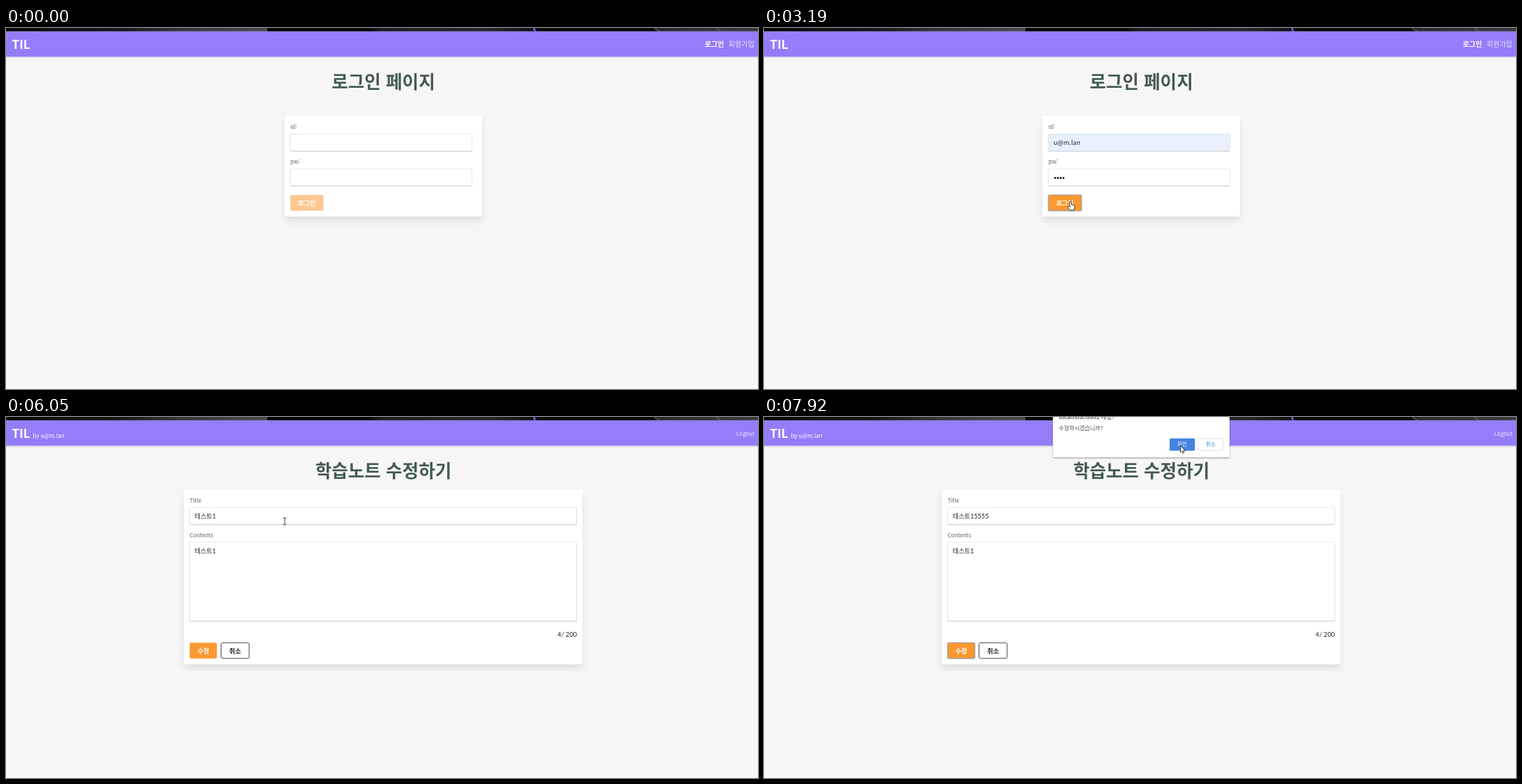
Write an HTML page that moves like this. It is 1079 by 519 pixels and loops after 7990 ms.

```html
<!DOCTYPE html>
<html lang="ko">
<head>
<meta charset="utf-8">
<title>TIL</title>
<style>
  html, body { margin: 0; width: 100%; height: 100%; overflow: hidden; background: #f6f6f8 }
  svg { display: block; width: 1079px; height: 519px; font-family: "Noto Sans CJK KR", "Noto Sans CJK", sans-serif; fill: #222 }
  .lato { font-family: Lato, "Noto Sans CJK KR", "Noto Sans CJK", sans-serif }
  .b { font-weight: 700 }
  .h1 { font-size: 25.6px; font-weight: 700; text-anchor: middle; fill: #435a53 }
  .h2 { font-size: 13.71px; font-weight: 700; fill: #111 }
  .body { font-size: 10.2px }
  .date { font-size: 8.23px; fill: #999 }
  .label { font-size: 8px; fill: #5b6270 }
  .input { font-size: 9.14px }
  .w { fill: #fff }
  .card { fill: #fff; filter: drop-shadow(0 7px 4px rgba(0,0,0,.075)) drop-shadow(0 1px 3px rgba(0,0,0,.03)) }
  .field { fill: #fff; stroke: #dfe2e7; stroke-width: .8; filter: drop-shadow(0 1px .6px rgba(0,0,0,.16)) }
  .field.auto { fill: #e8f0fe }
  .field.focus { stroke: #6f9fe6; stroke-width: 1.1 }
  .btn { fill: #fb982f }
  .btn.off { fill: #fcc994 }
  .btn.ring { stroke: #9a9ea6; stroke-width: 1.2 }
  .pop { fill: #fff; filter: drop-shadow(0 1px 1.3px rgba(0,0,0,.4)) }
  .caret { stroke: #111; stroke-width: .9 }
  .icon { fill: #34495e }
</style>
</head>
<body>
<svg viewBox="0 0 1079 519">
  <defs>
    <linearGradient id="strip">
      <stop offset="0" stop-color="#08080a"/><stop offset=".15" stop-color="#151518"/>
      <stop offset=".23" stop-color="#34343a"/><stop offset=".347" stop-color="#48484d"/>
      <stop offset=".348" stop-color="#050506"/><stop offset=".48" stop-color="#050506"/>
      <stop offset=".5" stop-color="#1b1b20"/><stop offset=".64" stop-color="#26262c"/>
      <stop offset=".72" stop-color="#08080a"/><stop offset=".86" stop-color="#08080a"/>
      <stop offset=".87" stop-color="#29292e"/><stop offset="1" stop-color="#3a3a40"/>
    </linearGradient>
    <g id="actions" class="icon">
      <path d="M0 10V7.6L6.2 1.4 8.6 3.8 2.4 10ZM7 .6 7.8-.2Q8.2-.5 8.6-.1L10 1.3Q10.3 1.7 10 2.1L9.3 2.9Z" transform="scale(.93)"/>
      <path d="M0 1H2.2L2.8.3H5.2L5.8 1H8V2.2H0ZM.6 3H7.4V9Q7.4 10 6.4 10H1.6Q.6 10 .6 9Z" transform="translate(12.8 -.4) scale(.95)"/>
    </g>
  </defs>

  <rect width="1079" height="519" fill="#f6f6f8"/>
  <rect y="5" width="1079" height="36.3" fill="#957df9" style="filter:drop-shadow(0 1px 1.5px rgba(0,0,0,.13))"/>
  <rect width="1079" height="4.8" fill="url(#strip)"/>
  <path d="M757.5 0 759 4.8" stroke="#6a66ff" stroke-width="2.4"/>
  <path d="M930 0 938 4.8M1019 0 1026 4.8" stroke="#77777c"/>
  <text class="w b" x="8.5" y="30" font-size="17.14">TIL</text>

  <g id="login">
    <text class="w b" x="1002.5" y="27" font-size="10.06">로그인</text>
    <text class="w" x="1036.7" y="27" font-size="10.06" opacity=".82">회원가입</text>
    <text class="h1" x="541.5" y="87.4">로그인 페이지</text>
    <rect class="card" x="399.5" y="126.5" width="283.5" height="144.5" rx="1"/>
    <text class="label" x="408" y="145">id:</text>
    <text class="label" x="408" y="195">pw:</text>
    <rect class="field" id="idField" x="408" y="152.6" width="260.6" height="24" rx="1"/>
    <rect class="field" id="pwField" x="408" y="202.6" width="260.6" height="24" rx="1"/>
    <text class="input" id="idText" x="415.5" y="168.4">u@m.lan</text>
    <g id="dots"></g>
    <path class="caret" id="pwCaret" d="M0 208.5V221.5"/>
    <rect class="btn" id="loginBtn" x="408" y="240" width="47.6" height="22.8" rx="2"/>
    <text class="w b input" x="431.8" y="255.1" text-anchor="middle">로그인</text>
    <g id="menu">
      <text id="preview" x="415.5" y="168.4" font-size="7.6" fill="#111">u@m.lan</text>
      <path class="caret" d="M415.6 157.5V171.5"/>
      <rect class="pop" x="407.5" y="177.5" width="109.5" height="90.5"/>
      <rect id="hover" x="408" y="181.5" width="109" height="20.5" fill="#c8c8c8"/>
      <g font-size="7.2" fill="#444">
        <text x="415" y="194.5">u@m.lan</text>
        <text x="415" y="215" font-size="7.9">두온빛</text>
        <text x="415" y="235.4">peka4312</text>
        <text x="415" y="255.8">peka4312@mova.lan</text>
      </g>
    </g>
  </g>

  <g id="member">
    <text class="w" x="38.5" y="30" font-size="8">by u@m.lan</text>
    <text class="w" x="1074" y="27" font-size="8" text-anchor="end" opacity=".85">Logout</text>
  </g>

  <g id="list">
    <text class="h1" x="541.5" y="87.4">학습노트 리스트</text>
    <g id="notes"></g>
    <circle cx="1057" cy="479" r="16" class="w" style="filter:drop-shadow(0 1px 2px rgba(0,0,0,.25))"/>
    <circle cx="1057" cy="479" r="15" class="btn"/>
    <text class="w b" x="1057" y="483" font-size="10" text-anchor="middle">+</text>
  </g>

  <g id="edit">
    <text class="h1" x="541.5" y="87.4">학습노트 수정하기</text>
    <rect class="card" x="255" y="104.5" width="572.3" height="251" rx="1"/>
    <text class="label" x="263.5" y="122.5">Title</text>
    <text class="label" x="263.5" y="172.5">Contents</text>
    <rect class="field" id="titleField" x="263.6" y="130" width="555.2" height="24" rx="1"/>
    <rect class="field" x="263.6" y="180" width="555.2" height="113" rx="1"/>
    <text class="input lato" id="titleText" x="270.8" y="145.6"></text>
    <text class="input lato" id="bodyText" x="270.8" y="195.6"></text>
    <path class="caret" id="titleCaret" d="M0 135.5V148.5"/>
    <text class="input lato" id="count" x="819" y="316" text-anchor="end"></text>
    <rect class="btn" id="saveBtn" x="263.6" y="324.5" width="39" height="22.7" rx="2"/>
    <text class="w b input" x="283.1" y="339.9" text-anchor="middle">수정</text>
    <rect class="w" x="308.5" y="324.7" width="40.4" height="22.3" rx="2" stroke="#333" stroke-width=".9"/>
    <text class="b input" x="328.7" y="339.9" text-anchor="middle">취소</text>
  </g>

  <g id="dialog">
    <rect class="pop" x="414.5" y="-10" width="253.5" height="68" rx="1"/>
    <text x="423" y="3" font-size="8.6">localhost:8081 내용:</text>
    <text x="423" y="18.6" font-size="8.1" fill="#555">수정하시겠습니까?</text>
    <rect x="582" y="30.7" width="36.3" height="17.8" rx="1.5" fill="#4483de"/>
    <rect class="w" x="623" y="30.9" width="35.8" height="17.4" rx="1.5" stroke="#dadce0" stroke-width=".8"/>
    <g font-size="7.6" text-anchor="middle">
      <text class="w" x="600" y="42.4">확인</text>
      <text x="641" y="42.4" fill="#4483de">취소</text>
    </g>
  </g>

  <g id="pointer" fill="#fff" stroke="#222" stroke-width=".85" stroke-linejoin="round">
    <path id="arrow" d="M0 0V10L2.3 7.9 3.8 11.2 5.3 10.5 3.9 7.3H6.8Z"/>
    <path id="hand" d="M-1.2 1Q0-1 1.2 1V5L4.6 5.8Q6 6.2 5.8 8L5 12.8H-1.6L-4 8.5Q-4.2 6.8-2.6 7.3L-1.2 8.5Z"/>
    <path id="beam" fill="none" d="M-2.2-4.8H2.2M0-4.8V4.8M-2.2 4.8H2.2"/>
  </g>
</svg>
<script>
const DURATION = 7990;
const $ = id => document.getElementById(id);
const show = (id, on) => { $(id).style.display = on ? '' : 'none'; };
const mark = (id, name, on) => $(id).classList.toggle(name, on);
const between = (t, a, b) => t >= a && t < b;

// Note cards: white halos first, then the row shadow, then the cards.
const halo = (x, y, w) => `<rect class="w" x="${x - 11}" y="${y}" width="${w + 22}" height="164" rx="18"/>`;
const note = ([title, body, date], x, y, w) => `
  <rect class="w" x="${x}" y="${y + 4}" width="${w}" height="137.5"/>
  <text class="h2" x="${x + 11.3}" y="${y + 21}">${title}</text>
  <text class="body lato" x="${x + 11.3}" y="${y + 42}">${body}</text>
  <text class="date lato" x="${x + w - 29.5}" y="${y + 135}" text-anchor="end">${date}</text>
  <use href="#actions" x="${x + w - 26.8}" y="${y + 126.4}"/>`;
const row = (y, w, notes) => {
  const x = i => 259 + i * 190.8;
  return notes.map((n, i) => halo(x(i), y, w)).join('') +
    `<rect x="257" y="${y + 13}" width="568.5" height="140" rx="9" fill="#e7e7e9"/>` +
    notes.map((n, i) => note(n, x(i), y, w)).join('');
};
$('notes').innerHTML =
  row(116, 183, [
    ['테스트입니다11233', '테스트입니다', '2020-02-23T07:51:55.449Z'],
    ['테스트1', '테스트1', '2020-03-07T06:48:39.792Z'],
    ['asdfasdfdasfdasf', '테스트1123123123', '2020-03-07T06:48:59.792Z']
  ]) +
  row(265.7, 565, [['ㄹㄹㄹㄹㄹㄹ', 'ㄹㄹㄹ', '2020-03-18T14:48:54.036Z']]);

const dotX = i => 417.6 + i * 4;
$('dots').innerHTML = [0, 1, 2, 3].map(i => `<circle cx="${dotX(i)}" cy="215.5" r="1.55"/>`).join('');

// Pointer path: time, x, y, shape from that time on.
const path = [
  [150, 1000, 478, 'arrow'], [700, 510, 172, 'beam'], [780, 490, 161, 'beam'],
  [940, 490, 161, 'beam'], [1130, 448, 178, 'arrow'], [1270, 440.5, 185, 'arrow'],
  [1560, 440.5, 190, 'arrow'], [1740, 440.5, 190, 'arrow'], [1790, 446, 201, 'arrow'],
  [1950, 446, 201, 'beam'], [2030, 450, 213, 'beam'], [2790, 450, 213, 'beam'],
  [2900, 441, 241, 'hand'], [2960, 440, 249, 'hand'], [3340, 440, 249, 'arrow'],
  [3900, 429, 245, 'arrow'], [4140, 429, 244, 'arrow'], [4450, 468.5, 242, 'arrow'],
  [4610, 596, 241, 'hand'], [4680, 609, 243, 'hand'], [4820, 609, 243, 'beam'],
  [4900, 617, 247, 'beam'], [5660, 617, 247, 'beam'], [5900, 420, 158, 'beam'],
  [6050, 400, 150, 'beam'], [6130, 370, 143, 'beam'], [6560, 370, 143, 'beam'],
  [6640, 345, 210, 'beam'], [6760, 304, 322, 'hand'], [6830, 299, 331, 'hand'],
  [6910, 298.3, 329, 'hand'], [7220, 298.3, 329, 'hand'], [7340, 330, 270, 'arrow'],
  [7840, 597.5, 41, 'arrow'], [DURATION, 597.5, 41, 'arrow']
];
const typed = (t, start, gap) => Math.max(0, Math.min(4, Math.floor((t - start) / gap) + 1));

function movePointer(t) {
  show('pointer', t >= 150);
  if (t < 150) return;
  const i = path.findIndex((p, k) => t < path[k + 1][0]);
  const [t0, x0, y0, shape] = path[i], [t1, x1, y1] = path[i + 1];
  const k = (t - t0) / (t1 - t0);
  $('pointer').setAttribute('transform', `translate(${x0 + (x1 - x0) * k} ${y0 + (y1 - y0) * k})`);
  for (const s of ['arrow', 'hand', 'beam']) show(s, s === shape);
}

function drawLogin(t) {
  const hovering = between(t, 1130, 1600), chosen = t >= 1600, dots = typed(t, 2280, 110);
  const pwFocus = between(t, 1950, 3110);
  show('menu', between(t, 940, 1600));
  show('preview', hovering);
  show('hover', hovering);
  show('idText', chosen);
  mark('idField', 'auto', hovering || chosen);
  mark('idField', 'focus', between(t, 940, 1950));
  mark('pwField', 'focus', pwFocus);
  [...$('dots').children].forEach((dot, i) => { dot.style.display = i < dots ? '' : 'none'; });
  show('pwCaret', pwFocus);
  $('pwCaret').setAttribute('transform', `translate(${dotX(dots) - 1.8} 0)`);
  mark('loginBtn', 'off', !dots);
  mark('loginBtn', 'ring', t >= 3110);
}

function drawEdit(t) {
  const loaded = t >= 5660, focused = between(t, 6130, 7140);
  const title = $('titleText');
  title.textContent = loaded ? '테스트1' + '5'.repeat(typed(t, 6290, 80)) : '제목을 입력해주세요.';
  $('bodyText').textContent = loaded ? '테스트1' : '내용을 입력해주세요.';
  title.style.fill = $('bodyText').style.fill = loaded ? '#222' : '#777';
  $('count').textContent = (loaded ? 4 : 0) + '/ 200';
  mark('titleField', 'focus', focused);
  show('titleCaret', focused);
  if (focused) $('titleCaret').setAttribute('transform', `translate(${271.2 + title.getComputedTextLength()} 0)`);
  mark('saveBtn', 'ring', t >= 7140);
}

function draw(now) {
  const t = now % DURATION;
  show('login', t < 3340);
  show('member', t >= 3340);
  show('list', between(t, 3340, 4820));
  show('edit', t >= 4820);
  show('dialog', t >= 7300);
  if (t < 3340) drawLogin(t);
  if (t >= 4820) drawEdit(t);
  movePointer(t);
}

let start;
function tick(now) {
  start ??= now;
  draw(now - start);
  requestAnimationFrame(tick);
}
draw(0);
requestAnimationFrame(tick);
</script>
</body>
</html>
```
